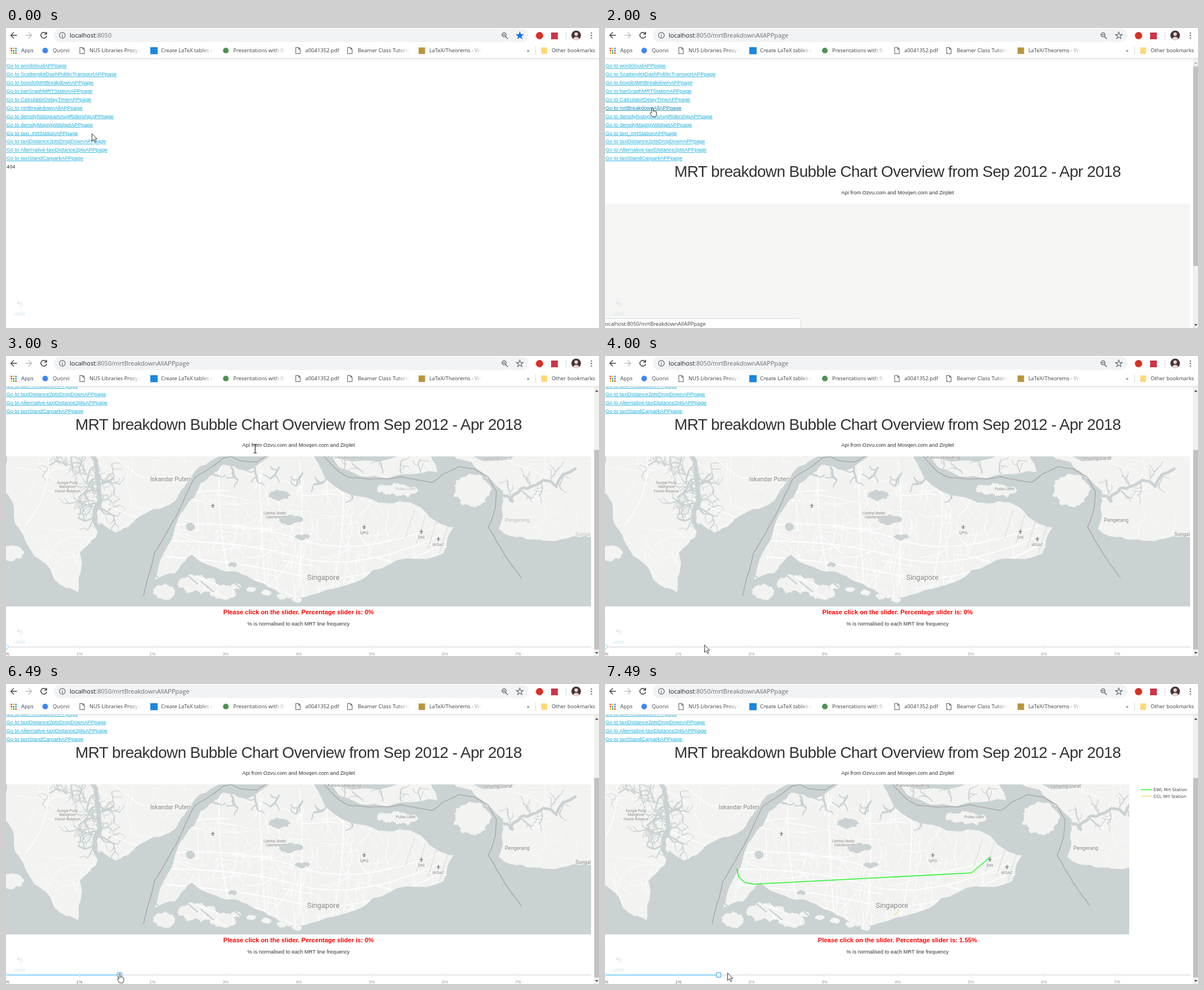
Write an HTML page that moves like this. It is 1052 px wide and 532 px high and loops after 8000 ms.

```html
<!DOCTYPE html>
<html lang="en">
<head>
<meta charset="utf-8">
<title>Dashboard walkthrough</title>
<style>
  html, body { margin: 0; width: 100%; height: 100%; overflow: hidden; background: #fff; }
  svg { display: block; width: 100%; height: 100%; }
  text { white-space: pre; }
  .ui { font: 9.4px "Open Sans", "Noto Sans", sans-serif; fill: #3c4043; }
  .url { font-size: 11px; fill: #6b6f73; }
  .body { font: 9.31px "Liberation Sans", Arial, sans-serif; fill: #323232; }
  .link { fill: #1eaedb; text-decoration: underline; }
  .link.hover { fill: #0d86b4; }
  .h1 { font-size: 27.94px; letter-spacing: -.58px; }
  .warn { font-size: 11.18px; font-weight: bold; fill: #f00; }
  .mark { font-size: 7.45px; fill: #999; }
  .mark.on { fill: #666; }
  .place { font-family: Roboto, "Open Sans", sans-serif; fill: #888; stroke: #f6f6f4; stroke-width: 1.2px; paint-order: stroke; }
  .legend { font: 7.45px "DejaVu Sans", Verdana, sans-serif; fill: #444; }
  .mid { text-anchor: middle; }
  .line { fill: none; stroke-linecap: round; stroke-linejoin: round; }
</style>
</head>
<body>
<svg viewBox="0 0 1052 532" preserveAspectRatio="none">
  <defs>
    <linearGradient id="fade"><stop offset="0" stop-color="#fff" stop-opacity="0"/><stop offset="1" stop-color="#fff"/></linearGradient>
    <clipPath id="mapClip"><rect id="mapWindow"/></clipPath>
    <clipPath id="cityClip"><path id="cityShape"/></clipPath>
    <clipPath id="landClip"><path id="landShape"/></clipPath>
    <clipPath id="avatarClip"><circle cx="1011.5" cy="13" r="8.5"/></clipPath>
  </defs>
  <rect width="1052" height="532" fill="#fff"/>
  <g id="page">
    <g id="links"></g>
    <text id="missing" class="body" x="1" y="115.5">404</text>
    <g id="report">
      <text class="body h1" x="123" y="130.5">MRT breakdown Bubble Chart Overview from Sep 2012 - Apr 2018</text>
      <text class="body mid" x="519" y="161">Api from Ozvu.com and Movqen.com and Zirplet</text>
      <rect id="mapBlank" y="178" width="1038" height="266" fill="#f5f5f3"/>
      <g clip-path="url(#mapClip)"><g id="map"></g></g>
      <g id="result"></g>
      <text id="percent" class="body warn mid" x="519" y="457.7"></text>
      <text class="body mid" x="519" y="477.5">% is normalised to each MRT line frequency</text>
      <g id="slider"></g>
    </g>
  </g>
  <g id="scrollbar">
    <rect x="1043" y="55" width="9" height="477" fill="#f1f1f1"/>
    <rect id="thumb" x="1043.5" width="8.5" height="354" fill="#c1c1c1"/>
    <path id="upArrow" d="M1045 63.5l3-3.5 3 3.5z"/>
    <path d="M1045 525l3 3.5 3-3.5z" fill="#505050"/>
  </g>
  <rect id="undoBack" x="14" y="478" width="21" height="37" fill="#fff"/>
  <path class="line" d="M23 485l-2.5 2.5 2.5 2.5m-2.5-2.5h5.500a2.800 2.800 0 0 1 0 5.500h-3" stroke="#d3e5ee" stroke-width="1.2"/>
  <text class="body" x="14" y="509.5" style="fill:#d3e5ee">undo</text>
  <g id="status">
    <path d="M-1 515.5h344q4.500 0 4.500 4.500v13h-349z" fill="#fff" stroke="#dadce0"/>
    <text class="ui" x="0" y="528">ocalhost:8050/mrtBreakdownAllAPPpage</text>
  </g>
  <g id="chrome"></g>
  <g id="cursor" stroke="#222" stroke-width=".9" stroke-linejoin="round" fill="#fff">
    <path id="arrow" d="M.5.500V13.500L3.500 10.700 5.800 15.600 7.900 14.600 5.700 9.900H9.700Z"/>
    <path id="hand" d="M3.500 9.500V1.700a1.300 1.300 0 0 1 2.600 0V6.500Q9 5 10.300 7.400 12 7 12 9V12L10.300 16.500H4.500L.8 10.800Q.2 9 2 9Z"/>
    <path id="beam" fill="none" stroke-width="1.2" d="M-3-7.500H3M0-7.500V7.500M-3 7.500H3"/>
  </g>
</svg>
<script>
const $ = id => document.getElementById(id);
const show = (id, on) => $(id).setAttribute("visibility", on ? "inherit" : "hidden");
const set = (id, attrs) => { for (const k in attrs) $(id).setAttribute(k, attrs[k]); };
const range = (n, make) => Array.from({ length: n }, (_, i) => make(i)).join("");
const label = (x, y, text, cls, extra = "") => `<text class="${cls}" x="${x}" y="${y}" ${extra}>${text}</text>`;
const line = (d, color, width) => `<path class="line" d="${d}" stroke="${color}" stroke-width="${width}"/>`;
const dot = (x, y, r, fill, extra = "") => `<circle cx="${x}" cy="${y}" r="${r}" fill="${fill}" ${extra}/>`;
const box = (x, y, w, h, fill) => `<rect x="${x}" y="${y}" width="${w}" height="${h}" fill="${fill}"/>`;

let seed = 11;
const random = () => (seed = (seed * 16807) % 2147483647) / 2147483647;
const between = (a, b) => a + random() * (b - a);

// Joins key points; each pass shifts every segment's midpoint sideways to roughen it.
function trace(points, rough = 0, closed = true) {
  let p = typeof points === "string" ? points.split(" ").map(s => s.split(",").map(Number)) : points;
  if (closed) p = [...p, p[0]];
  for (let pass = 0; rough && pass < 3; pass++)
    p = p.flatMap((a, i) => {
      const b = p[i + 1], k = between(-rough, rough) / 2;
      return b ? [a, [(a[0] + b[0]) / 2 + (a[1] - b[1]) * k, (a[1] + b[1]) / 2 + (b[0] - a[0]) * k]] : [a];
    });
  return "M" + p.map(q => q.map(v => v.toFixed(1)).join(" ")).join("L") + (closed ? "Z" : "");
}

const blob = (x, y, rx, ry) => trace(Array.from({ length: 9 }, (_, i) =>
  [x + rx * Math.cos(i * .7), y + ry * Math.sin(i * .7)]), .5);

function wander(x, y, heading, steps, size, turn) {
  const points = [[x, y]];
  for (let i = 0; i < steps; i++) {
    heading += between(-turn, turn) / 2;
    points.push([x += Math.cos(heading) * size, y += Math.sin(heading) * size]);
  }
  return trace(points, 0, false);
}

function creek(x, y, heading, width, depth) {
  const points = [];
  let side = "";
  for (let i = 0; i < 6; i++) {
    points.push([x, y]);
    if (depth && i % 2) side += creek(x, y, heading + (random() < .5 ? -1 : 1), width * .6, depth - 1);
    heading += between(-.65, .65);
    x += Math.cos(heading) * (3 + depth * 2);
    y += Math.sin(heading) * (3 + depth * 2);
  }
  return side + line(trace(points, 0, false), "#cad2d3", width);
}

function drawChrome() {
  const gray = "#5f6368", dark = "#3c4043";
  const palette = ["#ea4335", "#fbbc04", "#34a853", "#4285f4"];
  const sheet = x => line(`M${x} 34.5h5l3 3v8h-8zm5 0v3h3`, gray, 1.1);
  const starPoints = Array.from({ length: 10 }, (_, i) => {
    const r = i % 2 ? 2.6 : 6.3, a = i * Math.PI / 5;
    return [911.5 + r * Math.sin(a), 13.5 - r * Math.cos(a)];
  });
  const tabs = [[27, "Apps"], [83, "Quorvi"], [148, "NUS Libraries Proxy B", 241], [275, "Create LaTeX tables on", 369],
    [403, "Presentations with Bea", 497], [531, "a0041352.pdf"], [624, "Beamer Class Tutorial", 717],
    [751, "LaTeX/Theorems - Wik", 845], [924, "»"], [968, "Other bookmarks"]];
  $("chrome").innerHTML = box(0, 0, 1052, 54, "#fff") + box(0, 54, 1052, 1, "#cfcfcf") +
    `<rect x="85" y="1" width="842" height="24" rx="12" fill="#f1f3f4"/>` +
    line("M19 13H9m4.500-5l-5 5 5 5", dark, 1.4) + line("M35 13h10m-4.500-5l5 5-5 5", "#bbbec1", 1.4) +
    line("M71 9.500a5.200 5.200 0 1 0 1 5m0-7v3.500h-3.500", dark, 1.5) +
    dot(100, 13, 5.2, "none", `stroke="${gray}" stroke-width="1.2"`) + line("M100 12.500v3.300m0-5.600v.1", gray, 1.2) +
    `<text class="ui url" x="113" y="17"><tspan fill="#202124">localhost</tspan>:8050<tspan id="path">/mrtBreakdownAllAPPpage</tspan></text>` +
    dot(883.5, 12, 3.6, "none", `stroke="${gray}" stroke-width="1.3"`) + line("M886 15l4 4m-8.300-7h3.500", gray, 1.3) +
    `<path id="star" d="${trace(starPoints)}" stroke-width="1.1"/>` +
    dot(946.5, 13.5, 6.5, "#d93025") + box(967, 8, 12, 12, "#c8384a") + box(993, 6, 1, 14, "#d5d7da") +
    `<g clip-path="url(#avatarClip)">${box(1002, 4, 19, 19, "#4b3434") + dot(1011.5, 10.8, 3.1, "#e4d9d6") + dot(1011.5, 21, 5.5, "#e4d9d6")}</g>` +
    range(3, i => dot(1038.5, 9 + i * 4.3, 1.2, gray)) +
    range(9, i => box(8.3 + i % 3 * 4, 35 + Math.floor(i / 3) * 4, 2.6, 2.6, palette[(i * 3 >> 1) % 4])) +
    dot(69.5, 40, 5, "#4285f4") + box(256, 34, 13, 12.5, "#1b87dc") + dot(390, 40, 5, "#4b9150") +
    box(732, 34.5, 11.5, 11.5, "#b9953f") + [131, 514, 606].map(sheet).join("") +
    box(949.5, 34.5, 10.5, 11.5, "#fbd878") + box(939, 33, 1, 14, "#d5d7da") +
    tabs.map(([x, name, end]) => label(x, 43.2, name, "ui") +
      (end ? box(end - 22, 32, 21, 17, "url(#fade)") + box(end - 1, 32, 12, 17, "#fff") : "")).join("");
}

function drawLinks() {
  const names = ["wordcloud", "ScatterplotDashPublicTransport", "boxplotMrtBreakdown", "barGraphMRTStation",
    "CalculatorDelayTime", "mrtBreakdownAll", "densityhistogramAvgRidership", "densityMapIpyWidget",
    "taxi_mrtStation", "taxiDistance2ptsDropDown", "Alternative-taxiDistance2pts", "taxiStandCarpark"];
  $("links").innerHTML = names.map((n, i) =>
    label(.7, -63.2 + 14.9 * i, `Go to ${n}APPpage`, "body link")).join("");
}

function drawMap() {
  const sea = "#cad2d3";
  const west = trace("0,170 385,170 336,204 312,236 290,264 225,296 194,313 166,296 160,321 131,348 127,420 87,398 40,338 6,250 -5,236", .22);
  const east = trace("570,170 752,170 766,206 700,210 608,203", .25) +
    trace("778,170 1050,170 1050,326 985,325 905,321 874,306 882,240 826,188", .25);
  const city = trace("300,303 316,272 345,226 384,193 425,204 482,170 544,170 572,222 660,260 735,268 758,290 794,304 776,350 650,380 556,420 500,430 452,402 400,382 330,352 300,385 264,396", .18);
  const isles = blob(826, 240, 33, 29) + blob(694, 238, 38, 10) + blob(10, 350, 22, 14);
  const port = blob(340, 405, 36, 18) + blob(385, 420, 24, 13) + blob(280, 418, 20, 14) +
    range(5, i => blob(408 + i * 27, 408 + i * 6, 9, 5));
  $("landShape").setAttribute("d", west + east);
  $("cityShape").setAttribute("d", city + port);

  const tracks = (n, x0, x1, y1) => range(n, () =>
    line(wander(between(x0, x1), between(180, y1), between(0, 6.3), 9, 9, 1), "#fff", .8));
  const wild = tracks(34, 0, 340, 350) + tracks(22, 580, 1030, 320) +
    line(trace("166,312 157,278 166,245 162,216 152,170", .3, false), sea, 8) +
    line(trace("870,240 898,258 930,232 1010,200", .5, false), sea, 5) +
    range(9, i => creek(160, 195 + i * 11, i % 2 ? .2 : 3.2, 3, 2)) +
    range(5, i => creek(95 + i * 12, 190 + i * 5, 4.5, 2.4, 2)) +
    range(6, i => creek(895 + i * 18, 246 - i * 7, i % 2 ? 1 : 4.7, 2, 1)) +
    range(5, i => creek(600 + i * 34, 208, 4.6, 2, 1)) +
    line("M170 262L252 294M190 178L240 216 300 214M75 180Q80 245 35 300", "#fff", 1.5);

  // Street mesh: two leaning families of drifting lines, then sweeping expressways.
  const streets = range(230, () => {
    const x = between(270, 750), y = between(190, 425);
    const heading = (random() < .5 ? .1 : 1.6) - (x - 500) * .0012;
    return line(wander(x, y, heading, 7, between(6, 10), .6), "#fff", random() < .2 ? 1.3 : .8);
  }) + range(3, i => line(`M285 ${300 + i * 28}Q420 ${290 + i * 38} 520 ${325 + i * 32}T770 ${300 + i * 18}`, "#fff", 1.8)) +
    range(4, i => line(`M${380 + i * 70} 185Q${370 + i * 80} 280 ${400 + i * 60} 410`, "#fff", 1.5));
  const reservoirs = blob(485, 247, 20, 8) + blob(505, 290, 22, 8) + blob(526, 321, 14, 5) +
    blob(327, 303, 8, 8) + blob(402, 370, 8, 4);
  const inlets = range(7, i => creek(358 + i * 42, 198 + 10 * Math.max(0, i - 3), 1.6, 3.5, 1)) +
    range(6, i => line(`M${262 + i * 28} ${386 + i % 2 * 14}l22 18`, sea, 2.4));
  const runways = range(4, i => line(`M${724 + i * 20} ${274 + i * 9}l-15 48`, "#e4e6e5", 2.5));

  const border = "244,425 263,350 285,314 310,268 334,217 368,195 385,181 400,178 416,186 444,188 472,172";
  const eastBorder = "560,172 590,205 608,215 680,218 702,214 757,224 776,209 804,196 830,200 855,214 870,240 868,270 856,304 890,360 914,393";
  const place = ([x, y, size, text]) => label(x, y, text, "place mid", `font-size="${size}"`);
  const stack = (x, y, words) => words.map((w, i) => place([x, y + i * 7.4, 6.7, w])).join("");
  const planes = [[367, 265], [635.5, 303], [737, 311], [767, 324]];

  $("map").innerHTML = box(-10, 170, 1110, 290, sea) +
    `<path d="${west + east + isles}" fill="#f3f3f1"/><path d="${city + port}" fill="#f2f3f1"/>` +
    `<g clip-path="url(#landClip)">${wild}</g>` +
    `<g clip-path="url(#cityClip)">${streets}<path d="${reservoirs}" fill="${sea}"/>${inlets + runways}</g>` +
    line(trace(border, .05, false) + trace(eastBorder, .05, false), "#a5a3a3", 1.3) +
    [[291.5, 221.5, 10.7, "Iskandar Puteri"], [563, 396.5, 12.8, "Singapore"], [635.5, 315.5, 7.5, "QPG"],
      [736.5, 323.5, 7.5, "SIN"], [767, 337, 7.5, "WSAC"]].map(place).join("") +
    stack(109, 227, ["Sungai Pulai", "Mangrove", "Forest Reserve"]) + stack(477, 281, ["Central Water", "Catchment"]) +
    `<g id="lateLabels">${[[600, 181.5, 10, "Pasir Gudang"], [709, 237.5, 7.2, "Pulau Ubin"], [871, 183.5, 9, "Tanjung Surat"],
      [907, 294, 9.2, "Pengerang"], [1024, 318.5, 9, "Sungai"]].map(place).join("")}</g>` +
    planes.map(([x, y]) => line(`M${x} ${y - 3}v6m-3-3h6m-4.300 3h2.600`, "#666", 1.1)).join("");
}

function drawResult() {
  const entry = (name, color, y) => line(`M951 ${y}h19`, color, 1.4) + label(973, y + 2.6, `${name} Mrt Station`, "legend");
  $("result").innerHTML = line("M234 328L237 342 248 352 264 355 650 335 683 307", "#25f52a", 1.6) +
    line("M513 410l5-4 4-6", "#f7d774", 1.3) + entry("EWL", "#25f52a", 187.5) + entry("CCL", "#f7d774", 199);
}

function drawSlider(value) {
  const step = 129.7, end = value * step, blue = "#96dbfa";
  $("slider").innerHTML = box(0, 514.8, 1038, 2.5, "#e9e9e9") + box(0, 514.8, end, 2.5, blue) +
    range(8, i => dot(.5 + i * step, 516, 1.9, "#fff", `stroke="${i <= value ? blue : "#e4e4e4"}" stroke-width="1.2"`) +
      label(.5 + i * step, 530.7, `${i}%`, `body mark mid ${i <= value ? "on" : ""}`)) +
    (value ? `<rect x="${end - 3.5}" y="512" width="8" height="8" rx="1.5" fill="#fff" stroke="#61b5ec" stroke-width="1.5"/>`
      : dot(.5, 516, 3.7, "#fff", `stroke="${blue}" stroke-width="1.3"`));
}

const pointer = [[0, "arrow", 152, 187], [500, "hand", 81, 140], [1010, "hand", 79.5, 141], [2510, "arrow", 437, 160],
  [3000, "beam", 442, 164.5], [3500, "arrow", 282, 511], [4000, "arrow", 176, 512], [4490, "arrow", 825, 516],
  [4990, "arrow", 825, 518], [5490, "arrow", 241, 511], [5990, "arrow", 203, 510], [6490, "hand", 197, 513.5],
  [7490, "arrow", 217, 512]];

let sliderValue = -1;

function draw(t) {
  const visited = t >= 1500, loaded = t >= 2000, tiled = t >= 2510, scrolled = t >= 3000, filtered = t >= 6990;
  const hovering = t >= 500 && !tiled;

  const [, kind, x, y] = pointer.filter(p => p[0] <= t).pop();
  for (const id of ["arrow", "hand", "beam"]) show(id, id === kind);
  set("cursor", { transform: `translate(${x} ${y})` });

  show("path", visited);
  set("star", visited ? { fill: "none", stroke: "#5f6368" } : { fill: "#1a73e8", stroke: "#1a73e8" });
  $("links").children[5].classList.toggle("hover", hovering);
  show("status", hovering);
  set("status", { opacity: t < 1010 ? .6 : 1 });

  set("page", { transform: `translate(0 ${scrolled ? 0 : 133.5})` });
  show("missing", !loaded);
  show("report", loaded);
  show("scrollbar", loaded);
  set("thumb", { y: scrolled ? 166.5 : 68 });
  set("upArrow", { fill: scrolled ? "#505050" : "#b5b5b5" });
  show("undoBack", tiled && !scrolled);

  show("map", tiled);
  show("mapBlank", !scrolled);
  set("mapWindow", scrolled ? { x: 0, y: 178, width: filtered ? 930 : 1038, height: 266 }
    : { x: 0, y: 244, width: 382, height: 200 });
  set("map", { transform: `translate(${filtered ? -54 : 0} 0)` });
  set("lateLabels", { opacity: t < 3500 ? .5 : t < 4000 ? .75 : 1 });
  show("result", filtered);
  $("percent").textContent = `Please click on the slider. Percentage slider is: ${filtered ? "1.55" : "0"}%`;

  const value = t >= 6490 ? 1.55 : 0;
  if (value !== sliderValue) drawSlider(sliderValue = value);
}

drawChrome();
drawLinks();
drawMap();
drawResult();
const start = performance.now();
(function tick() {
  draw((performance.now() - start) % 8000);
  requestAnimationFrame(tick);
})();
</script>
</body>
</html>
```
